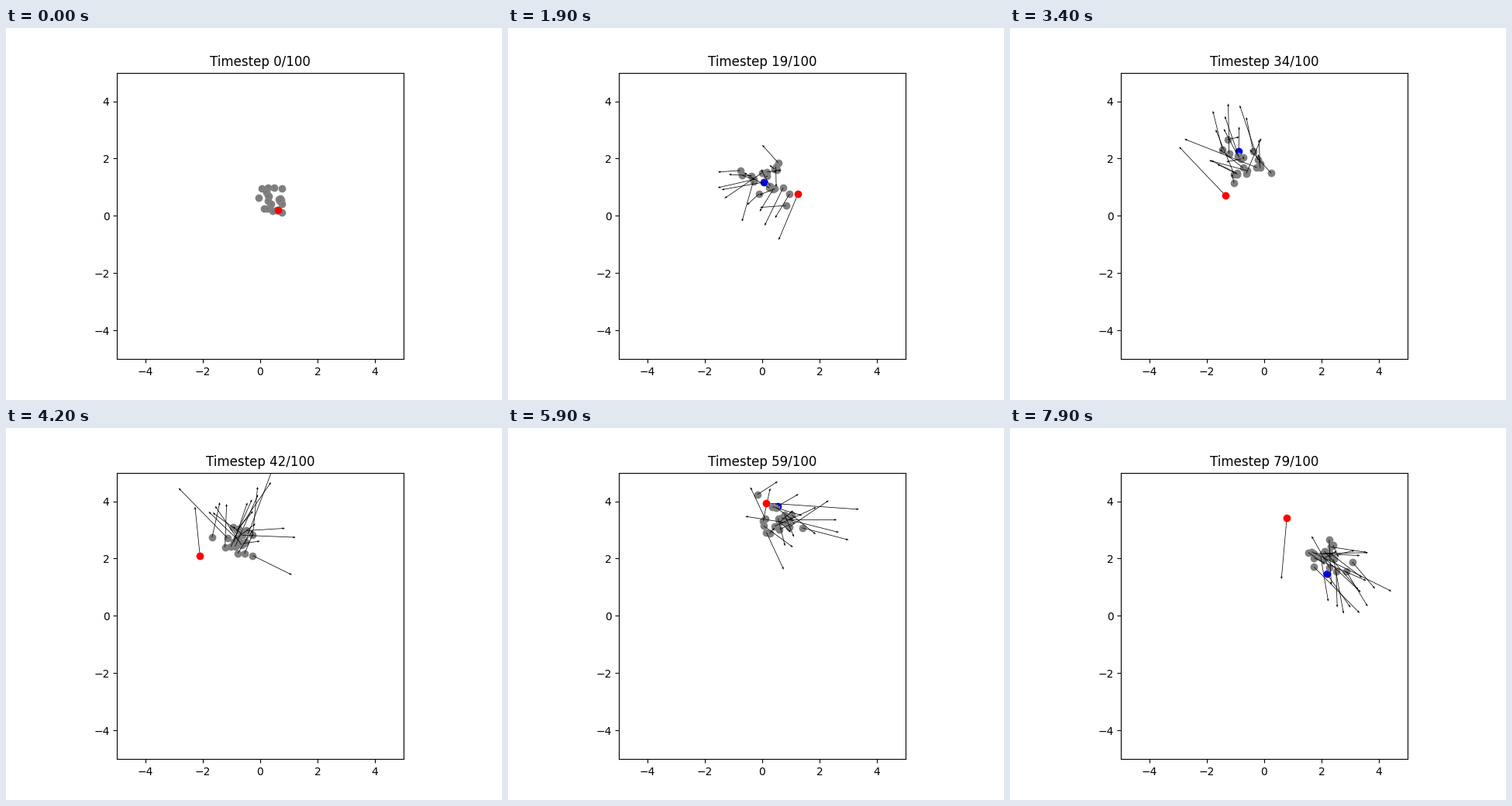
Animation of 640 by 480 pixels, one loop 8000 ms. Source, as a matplotlib script:

```python
import numpy as np
import matplotlib.pyplot as plt
from matplotlib.animation import FuncAnimation

FRAMES, STEP, GREYS = 80, 0.1, 20
TIMES = np.array([0, 12, 25, 34, 50, 59, 79]) * STEP

# Key points of the red agent with its speeds, the blue agent and the flock centre.
RED = [(.62, .20), (.70, 1.72), (.27, .14), (-1.35, .71),
       (-1.50, 3.42), (.13, 3.94), (.79, 3.42)]
RED_SPEED = [(0, 0), (2.46, -.57), (-2.46, -.14), (-1.62, 1.70),
             (1.76, 1.57), (3.25, -.22), (-.19, -2.14)]
BLUE = [(.62, .20), (.87, 1.23), (-.65, 1.23), (-.89, 2.26),
        (-.08, 2.80), (.54, 3.83), (2.19, 1.47)]
CENTRE = [(.43, .57), (.49, 1.28), (-.16, 1.23), (-.70, 1.85),
          (-.32, 3.20), (.49, 3.40), (2.10, 2.04)]


def track(points, speeds=None):
    """Smooth path through key points: t -> (position, velocity)."""
    p = np.array(points)
    v = np.gradient(p, TIMES, axis=0) if speeds is None else np.array(speeds)

    def at(t):
        k = min(np.searchsorted(TIMES, t, side="right") - 1, len(TIMES) - 2)
        h = TIMES[k + 1] - TIMES[k]
        s = (t - TIMES[k]) / h
        pos = ((1 + 2 * s) * (1 - s) ** 2 * p[k] + s * (1 - s) ** 2 * h * v[k]
               + s * s * (3 - 2 * s) * p[k + 1] + s * s * (s - 1) * h * v[k + 1])
        vel = (6 * s * (1 - s) * (p[k + 1] - p[k]) / h
               + (1 - s) * (1 - 3 * s) * v[k] + s * (3 * s - 2) * v[k + 1])
        return pos, vel

    return at


red_at, blue_at, centre_at = track(RED, RED_SPEED), track(BLUE), track(CENTRE)

# Each grey agent swings around the centre on its own ellipse.
rng = np.random.default_rng(4)
start = rng.uniform(-.5, .5, (GREYS, 2))
swing = rng.normal(0, .48, (GREYS, 2)).clip(-.9, .9)
start -= start.mean(axis=0)
swing -= swing.mean(axis=0)
rate = rng.uniform(1.8, 2.6, (GREYS, 1))


def state(n):
    """Positions and velocities; rows are red, blue, then the greys."""
    t = n * STEP
    (rp, rv), (bp, bv), (cp, cv) = red_at(t), blue_at(t), centre_at(t)
    c, s = np.cos(rate * t), np.sin(rate * t)
    pos = np.vstack([rp, bp, cp + start * c + swing * s])
    vel = np.vstack([rv, bv, cv + rate * (swing * c - start * s)])
    return pos, vel * (n > 0)


fig, ax = plt.subplots(figsize=(6.4, 4.8), dpi=100)
ax.set(xlim=(-5, 5), ylim=(-5, 5))
ax.set_aspect("equal")
title = ax.set_title("Timestep 0/100")

pos, vel = state(0)
blue = ax.scatter(*pos[1], color="blue", zorder=1)
flock = ax.scatter(*pos[2:].T, color="gray", zorder=2)
arrows = ax.quiver(*pos.T, *vel.T, angles="xy", scale_units="xy", scale=1,
                   width=0.002, headwidth=3.5, headlength=4.5,
                   headaxislength=4.5, color="black", zorder=3)
red = ax.scatter(*pos[0], color="red", zorder=4)


def update(n):
    pos, vel = state(n)
    red.set_offsets(pos[:1])
    blue.set_offsets(pos[1:2])
    flock.set_offsets(pos[2:])
    arrows.set_offsets(pos)
    arrows.XY = pos   # arrow angles are worked out from the tails
    arrows.set_UVC(*vel.T)
    title.set_text(f"Timestep {n}/100")
    return red, blue, flock, arrows, title


anim = FuncAnimation(fig, update, frames=FRAMES, interval=100,
                     repeat=True, repeat_delay=0, blit=False)
plt.show()
```
